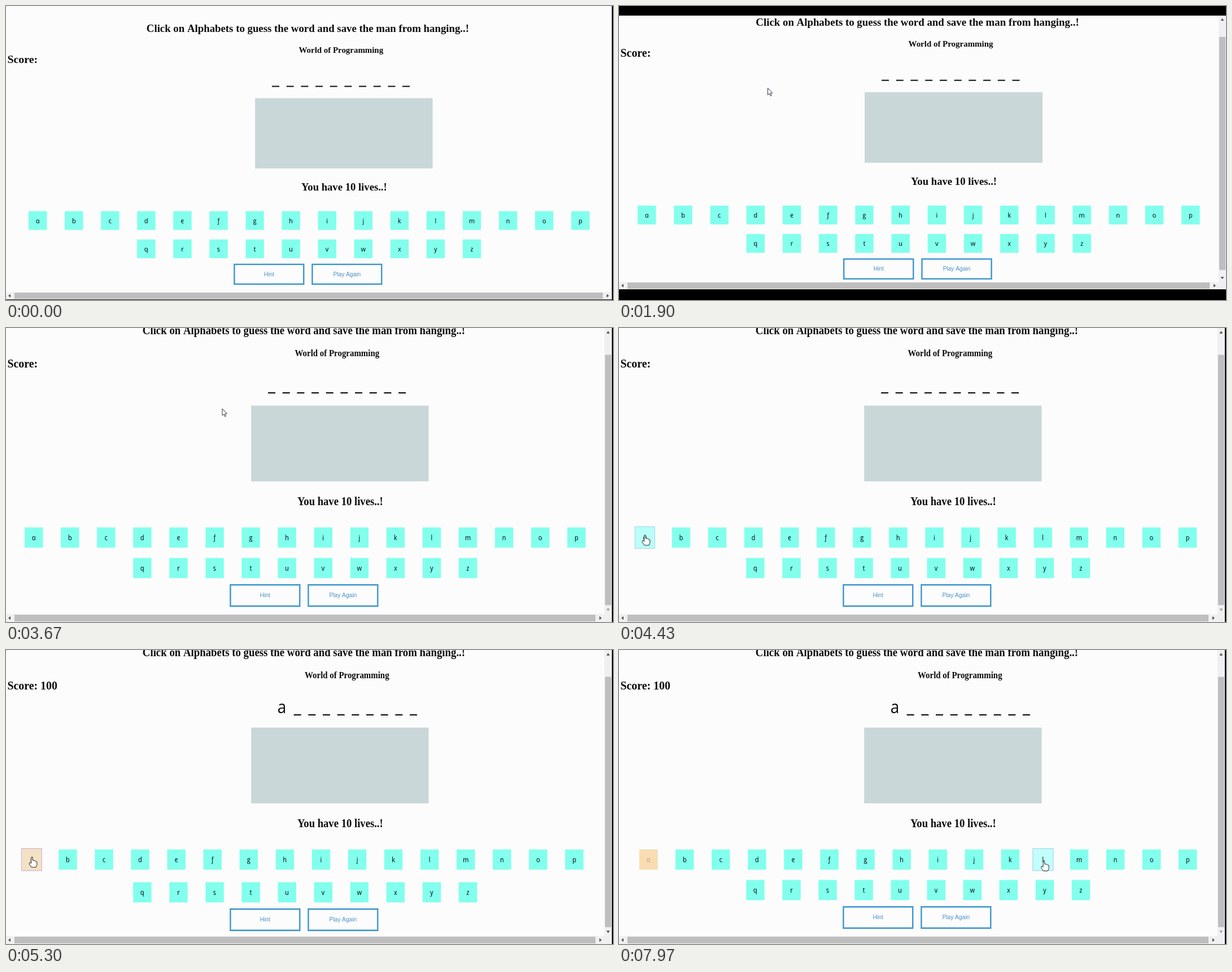
An HTML page with a canvas for the animation above (8000 ms loop, 1075 px wide and 521 px high).

```html
<!DOCTYPE html>
<html lang="en">
<head>
<meta charset="utf-8">
<title>Word guessing game</title>
<style>
html, body { margin: 0; width: 100%; height: 100%; overflow: hidden; background: #000; }
canvas { display: block; }
</style>
</head>
<body>
<canvas id="stage" width="1075" height="521"></canvas>
<script>
const ctx = document.getElementById('stage').getContext('2d');
const LOOP = 8000, CLICK = 4560;
const INK = '#0c0c0c', BLUE = '#3a96cc';
const SERIF = '"Liberation Serif", serif';

const ease = x => x * x * (3 - 2 * x);
const ramp = (t, a, b) => ease(Math.min(1, Math.max(0, (t - a) / (b - a))));

// Eased value along [time, value...] stops.
function track(t, stops) {
  let i = 0;
  while (i < stops.length - 2 && t >= stops[i + 1][0]) i++;
  const [ta, ...a] = stops[i], [tb, ...b] = stops[i + 1];
  const k = ramp(t, ta, tb);
  return a.map((v, n) => v + (b[n] - v) * k);
}

function rect(x, y, w, h, color, alpha = 1) {
  ctx.globalAlpha = alpha;
  ctx.fillStyle = color;
  ctx.fillRect(x, y, w, h);
  ctx.globalAlpha = 1;
}

function frame(x, y, w, h, line, color, alpha = 1) {
  ctx.globalAlpha = alpha;
  ctx.strokeStyle = color;
  ctx.lineWidth = line;
  ctx.strokeRect(x + line / 2, y + line / 2, w - line, h - line);
  ctx.globalAlpha = 1;
}

function text(str, x, y, font, color = INK, align = 'center') {
  ctx.font = font;
  ctx.fillStyle = color;
  ctx.textAlign = align;
  ctx.fillText(str, x, y);
}

function shape(points, fill, stroke) {
  ctx.beginPath();
  points.forEach(([x, y]) => ctx.lineTo(x, y));
  ctx.closePath();
  ctx.fillStyle = fill;
  ctx.fill();
  if (stroke) {
    ctx.strokeStyle = stroke;
    ctx.lineWidth = 1;
    ctx.stroke();
  }
}

function scrollArrow(x, y, dx, dy, color = '#505050') {
  shape([[x + 2 * dx, y + 2 * dy],
    [x - 2 * dx + 3 * dy, y - 2 * dy + 3 * dx],
    [x - 2 * dx - 3 * dy, y - 2 * dy - 3 * dx]], color);
}

function scrollbars(view, scroll, atEnd) {
  const { barY, right, hasBar } = view;
  rect(0, barY, 1075, 13, '#f0f0f0');
  rect(15, barY + 1, right - 31, 11, '#bebebe');
  scrollArrow(6, barY + 6.5, -1, 0);
  scrollArrow(right - 7, barY + 6.5, 1, 0);
  if (!hasBar) return;
  rect(right, 0, 13, barY, '#f0f0f0');
  rect(right + 1, 14 + scroll * 0.84, 11, 413, '#bebebe');
  scrollArrow(right + 6.5, 7, 0, -1, scroll ? '#505050' : '#a0a0a0');
  scrollArrow(right + 6.5, 465, 0, 1, atEnd ? '#a0a0a0' : '#505050');
}

// The italic's single-storey letters, set upright.
function keyLabel(letter, x, y, color) {
  ctx.save();
  ctx.transform(1, 0, 0.21, 1, x + 0.6, y);
  text(letter, 0, 0, 'italic 12px "Open Sans", sans-serif', color);
  ctx.restore();
}

function key(letter, cx, cy, hover, used) {
  const w = 32.5 + 4.3 * hover, h = 33.3 + 4 * hover;
  const box = [cx - w / 2, cy - h / 2, w, h];
  rect(...box, '#82ffed');
  rect(...box, '#c2fffb', hover);
  rect(...box, '#fbdcb2', used);
  rect(...box, '#f0e8d8', used * hover * 0.5);
  frame(...box, 1, used ? '#d3afe6' : '#b5cdf0', hover);
  keyLabel(letter, cx, cy + 4.5, used > 0.5 ? '#b3aa9c' : INK);
}

function keyboard(t, drop) {
  const hoverA = ramp(t, 4300, 4470) - ramp(t, 5370, 5570);
  const hoverL = ramp(t, 7750, 7900);
  const used = ramp(t, CLICK, CLICK + 370);
  [...'abcdefghijklmnopqrstuvwxyz'].forEach((letter, i) => {
    const top = i < 16;
    let x = 49.3 + 64.2 * (top ? i : i - 13);
    if (top) x += (i < 11 ? 3 : -3) * hoverL - 3.8 * hoverA;
    const hover = letter === 'a' ? hoverA : letter === 'l' ? hoverL : 0;
    key(letter, x, top ? 381.7 : 432 + drop, hover, letter === 'a' ? used : 0);
  });
}

function button(label, x, y) {
  frame(x, y, 125.5, 37.5, 2.4, BLUE);
  text(label, x + 62.7, y + 22, '10.2px "Liberation Sans", sans-serif', '#4a90c6');
}

function page(t, drop) {
  const guessed = t >= CLICK;
  text('Click on Alphabets to guess the word and save the man from hanging..!',
    528.5, 46, `bold 18.85px ${SERIF}`);
  text('World of Programming', guessed ? 605 : 587.5, 83, `bold 14.95px ${SERIF}`);
  if (guessed) text('a', 489.5, 140.5, '28px "Open Sans", sans-serif');
  for (let i = guessed ? 1 : 0; i < 10; i++) {
    rect((guessed ? 485 : 465) + 25.72 * i, 142, 13, 2, INK);
  }
  rect(435, 164, 315, 125, '#cad7d9');
  text('You have 10 lives..!', 593, 328, `bold 18.7px ${SERIF}`);
  keyboard(t, drop);
  button('Hint', 397, 458.5 + drop);
  button('Play Again', 535.3, 458.5 + drop);
}

function cursor(t) {
  if (t < 130) return;
  const [x, y] = t < 3670
    ? track(t, [[270, 1048, 482], [600, 263.5, 145.5]])
    : track(t, [[3670, 383, 143], [4400, 46, 367], [5370, 46, 367], [5600, 126, 252],
      [5900, 126, 252], [6400, 517, 289.5], [7230, 517, 289.5], [7850, 752.5, 373.5]]);
  const hand = (t > 4300 && t < 5410) || t > 7750;
  ctx.save();
  ctx.translate(x, y);
  if (hand) {
    shape([[-1, 0], [1, 0], [1.5, 6], [4, 6], [6, 7], [8.5, 8], [9, 13], [7, 18],
      [-1, 18], [-5, 12], [-4, 9.5], [-1.5, 11]], '#fff', '#222');
  } else {
    shape([[0, 0], [0, 12], [2.8, 9.6], [4.8, 14], [6.6, 13.2], [4.7, 9], [8.3, 8.7]],
      '#fff', '#33333f');
  }
  ctx.restore();
}

function viewAt(t) {
  if (t < 130) return { sx: 0.998, sy: 0.996, top: 0, shift: 7, barY: 509, right: 1075, hasBar: false };
  const view = { sx: 1, sy: 1, top: 17, shift: 0, barY: 472, right: 1062, hasBar: true };
  return t < 3670 ? view : { ...view, sx: 0.998, sy: 521 / 485, top: 0 };
}

function draw(t) {
  const view = viewAt(t);
  const [scroll] = track(t, [[1770, 0], [1900, 28.3], [2300, 28.3], [2500, 36]]);
  const drop = 3.7 * (ramp(t, CLICK, 4800) - ramp(t, 5370, 5570));
  rect(0, 0, 1075, 521, '#000');
  ctx.save();
  ctx.translate(0, view.top);
  ctx.scale(view.sx, view.sy);
  rect(0, 0, 1075, view.barY + 13, '#fcfcfc');
  ctx.save();
  ctx.beginPath();
  ctx.rect(0, 0, view.right, view.barY);
  ctx.clip();
  ctx.translate(0, -scroll);
  text(t < CLICK ? 'Score:' : 'Score: 100', 2.5, 101, `bold 19.9px ${SERIF}`, INK, 'left');
  ctx.translate(view.shift, 0);
  page(t, drop);
  ctx.restore();
  scrollbars(view, scroll, scroll >= 36 && !drop);
  ctx.restore();
  cursor(t);
}

function tick() {
  draw(performance.now() % LOOP);
  requestAnimationFrame(tick);
}
tick();
</script>
</body>
</html>
```
